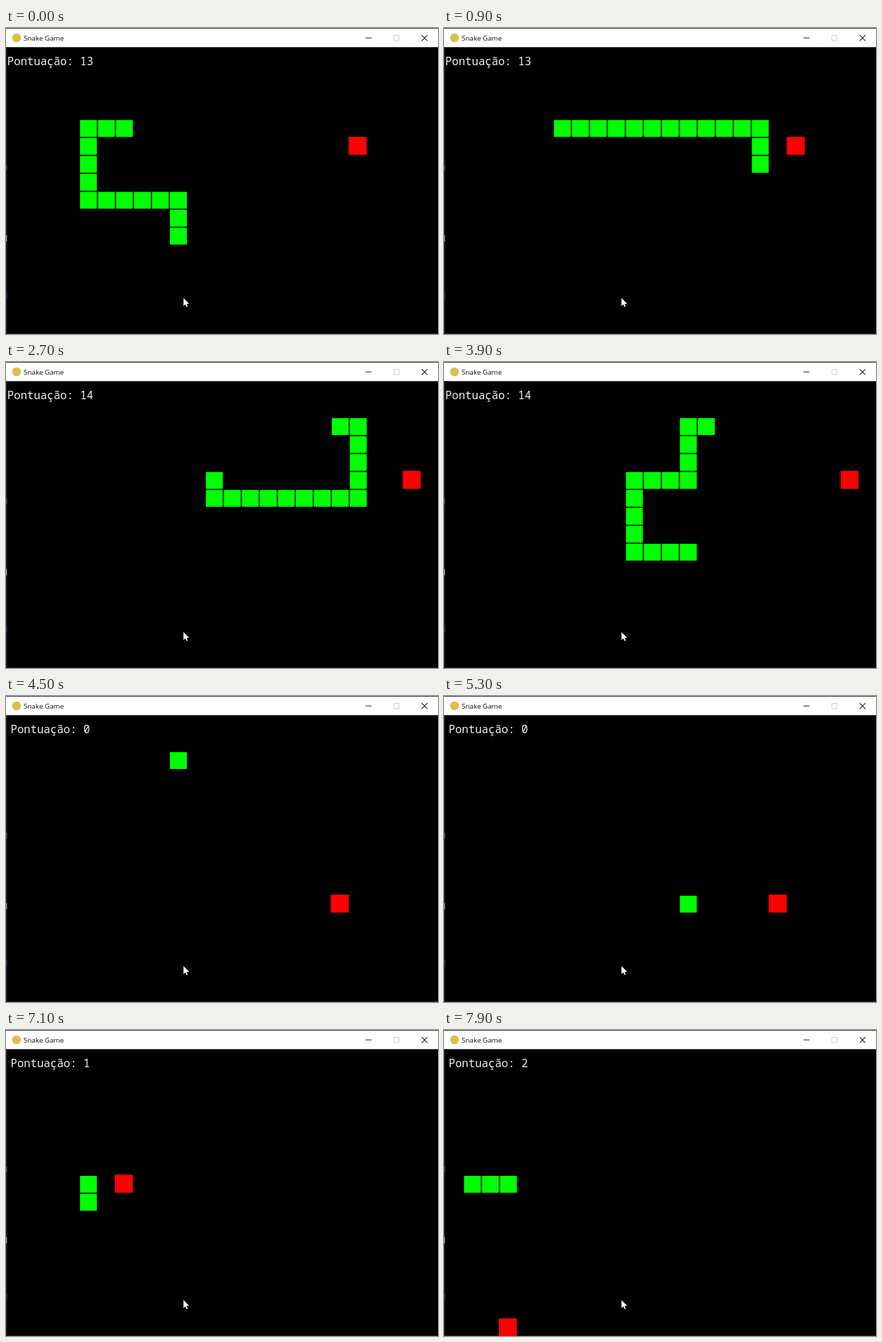
Write an HTML page with a canvas that moves like this. It is 614 px wide and 436 px high and loops after 8000 ms.

```html
<!DOCTYPE html>
<html lang="pt">
<head>
<meta charset="utf-8">
<title>Snake Game</title>
<style>
html, body { margin: 0; width: 100%; height: 100%; overflow: hidden; background: #000; }
canvas { display: block; width: 614px; height: 436px; }
</style>
</head>
<body>
<canvas id="stage"></canvas>
<script>
const W = 614, H = 436, LOOP = 8000, FRAME = 100;
const CELL = 25.57, LEFT = 1.3, TOP = 27.1;
const canvas = document.getElementById('stage');
const ratio = window.devicePixelRatio || 1;
canvas.width = W * ratio;
canvas.height = H * ratio;
const ctx = canvas.getContext('2d');
ctx.scale(ratio, ratio);

const STEP = { U: [0, -1], D: [0, 1], L: [-1, 0], R: [1, 0] };

// Expands "R3 U2" into the list of cells walked from (x, y).
function walk(x, y, route) {
  const cells = [[x, y]];
  for (const run of route.split(' ')) {
    const [dx, dy] = STEP[run[0]];
    for (let i = +run.slice(1); i > 0; i--) cells.push([x += dx, y += dy]);
  }
  return cells;
}

const RESTART = 62;
const firstLife = walk(9, 10, 'U2 L5 U4 R13 D2 R1 U3 L7 D3 R8 U4 L6 D3 L3 D4 R3 U4');
const secondLife = walk(4, 2, 'R5 D8 R10 U2 L9 U2 L6 D3 R3 U2 L6');

// Each stage begins at a move count.
const stages = [
  { from: 0, score: 13, apple: [19, 5] },
  { from: 36, score: 14, apple: [22, 5] },
  { from: RESTART, score: 0, apple: [18, 10] },
  { from: 84, score: 1, apple: [6, 7] },
  { from: 113, score: 2, apple: [3, 15] }
];

function movesAt(ms) {
  return Math.floor(Math.floor(ms / FRAME) * FRAME * 0.01493 + 0.1);
}

function rect(color, x, y, w, h) {
  ctx.fillStyle = color;
  ctx.fillRect(x, y, w, h);
}

function shape(points) {
  ctx.beginPath();
  points.forEach(([x, y], i) => i ? ctx.lineTo(x, y) : ctx.moveTo(x, y));
}

function text(str, x, y, font, color, align) {
  ctx.font = font;
  ctx.fillStyle = color;
  ctx.textAlign = align;
  ctx.fillText(str, x, y);
}

function drawWindow() {
  rect('#000', 0, 0, W, H);
  rect('#fff', 0, 1, W, 26.3);
  rect('#444', 0, 0, W, 1);
  rect('#2a2a2e', 0, 27.3, 1.3, H);
  rect('#2a7480', 0, 195, 1.3, 8);
  rect('#a0a0a0', 0, 295, 1.3, 9);
  rect('#3c3a7c', 0, 376, 1.3, 9);
  rect('#302826', 0, 435.2, W, 0.8);

  ctx.fillStyle = '#dcc04c';
  ctx.beginPath();
  ctx.arc(15, 14, 6.3, 0, Math.PI * 2);
  ctx.fill();
  text('Snake Game', 25, 17.8, '9.85px "Open Sans", "Noto Sans", sans-serif', '#111', 'left');

  rect('#222', 511, 13.6, 8.5, 1);
  ctx.lineWidth = 0.9;
  ctx.strokeStyle = '#ccc';
  ctx.strokeRect(551.2, 10.5, 7.4, 7.4);
  ctx.lineWidth = 1.1;
  ctx.strokeStyle = '#222';
  for (const [a, b] of [[10.2, 18.4], [18.4, 10.2]]) {
    shape([[590.8, a], [599, b]]);
    ctx.stroke();
  }
}

function drawCursor() {
  shape([[252.3, 384.8], [252.3, 396.2], [254.9, 393.8], [256.6, 397.6],
    [258.3, 396.9], [256.7, 393.2], [260.2, 393]]);
  ctx.closePath();
  ctx.fillStyle = '#fff';
  ctx.fill();
}

function draw(ms) {
  const n = movesAt(ms);
  const stage = stages.filter(s => s.from <= n).pop();
  const head = n < RESTART ? n + 13 : n - RESTART;
  const path = n < RESTART ? firstLife : secondLife;
  const snake = path.slice(Math.max(0, head - stage.score), head + 1);
  const [ax, ay] = stage.apple;

  drawWindow();
  for (const [x, y] of snake) {
    rect('#0f0', LEFT + 1.6 + x * CELL, TOP + 1.8 + y * CELL, 24, 24);
  }
  rect('#f00', LEFT + ax * CELL, TOP + 0.2 + ay * CELL, 25.6, 25.6);
  text('Pontuação: ' + stage.score, 63, 53,
    '500 15.7px "Noto Sans Mono", "DejaVu Sans Mono", monospace', '#f0f0f0', 'center');
  drawCursor();
}

const start = performance.now();
function tick() {
  draw((performance.now() - start) % LOOP);
  requestAnimationFrame(tick);
}
tick();
</script>
</body>
</html>
```
